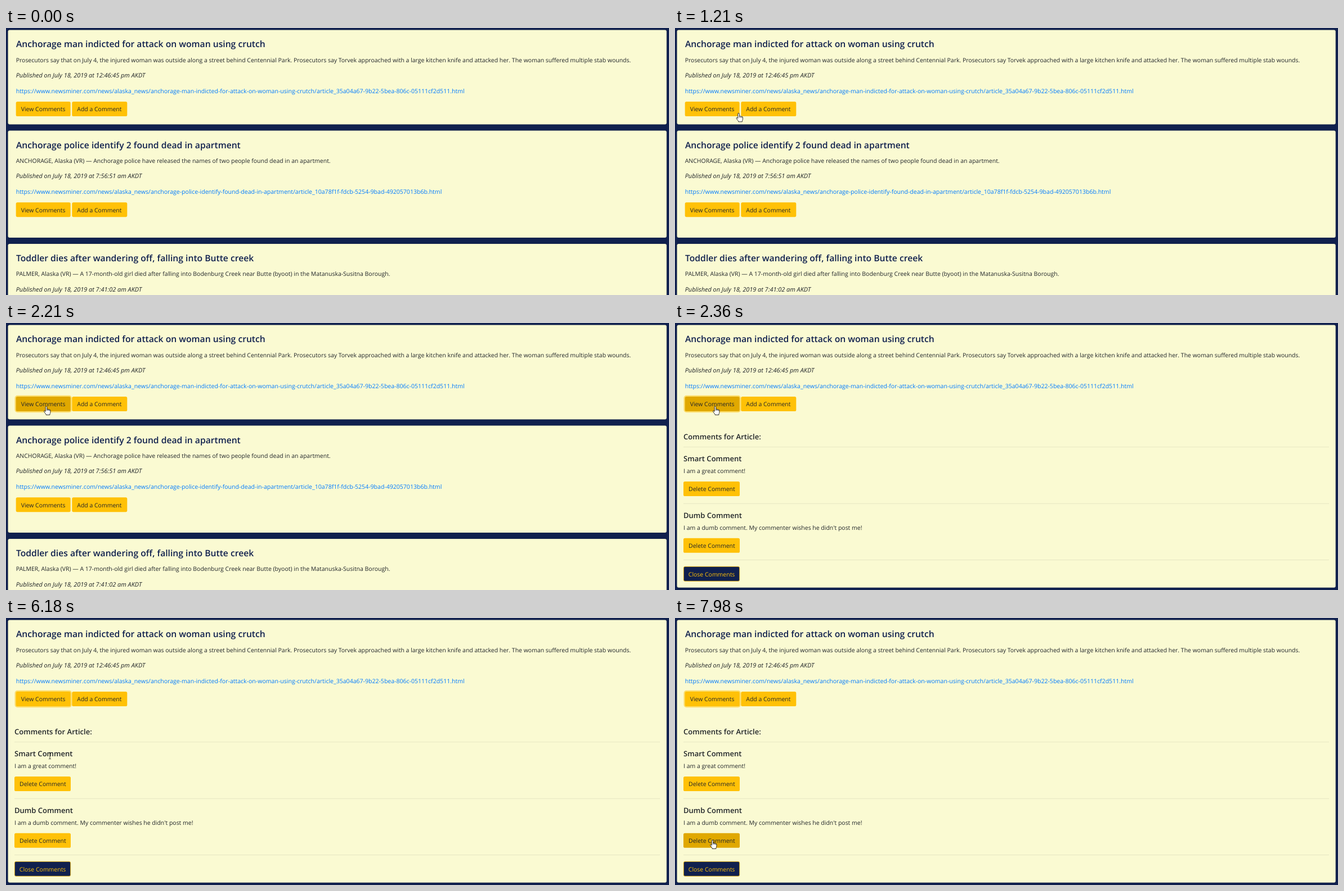
Write an HTML page that moves like this. It is 1178 by 475 pixels and loops after 8 s.

```html
<!DOCTYPE html>
<html lang="en">
<head>
<meta charset="utf-8">
<title>Article comments</title>
<style>
html, body { margin: 0; width: 100%; height: 100%; overflow: hidden; background: #10204e; }
svg { display: block; width: 1178px; height: 475px; }
text { font: 10.47px "Open Sans", "Noto Sans", sans-serif; fill: #212529; text-rendering: geometricPrecision; white-space: pre; }
.title { font-size: 15.68px; font-weight: 600; fill: #10204e; }
.head { font-size: 13.05px; font-weight: 600; }
.date { font-size: 10.93px; font-style: italic; }
.link { font-size: 10.54px; fill: #007bff; }
.close { fill: #ffc107; }
.card { fill: #fafad2; stroke: #000; stroke-opacity: .125; stroke-width: .7; }
</style>
</head>
<body>
<svg id="stage" viewBox="0 0 1178 475" xmlns="http://www.w3.org/2000/svg"></svg>
<script>
const LOOP = 8000;
const NS = 'http://www.w3.org/2000/svg';
const stage = document.getElementById('stage');

function add(parent, tag, attrs = {}, text) {
  const el = document.createElementNS(NS, tag);
  for (const k in attrs) el.setAttribute(k, attrs[k]);
  if (text) el.textContent = text;
  return parent.appendChild(el);
}
const group = () => add(stage, 'g');
const label = (g, x, y, cls, text) => add(g, 'text', { x, y, class: cls }, text);
const card = (g, y, height) =>
  add(g, 'rect', { class: 'card', x: 3.5, y, width: 1170.3, height, rx: 3 });

function button(g, x, y, width, text, dx = 9, style = {}) {
  const rect = add(g, 'rect', { x, y, width, height: 26, rx: 2.6, fill: '#ffc107', ...style });
  label(g, x + dx, y + 17.3, style.stroke ? 'close' : '', text);
  return rect;
}

function article(g, y, title, body, date, link) {
  label(g, 18, y + 31.4, 'title', title);
  label(g, 17.7, y + 57.8, '', body);
  label(g, 17.7, y + 85.2, 'date', 'Published on July 18, 2019 at ' + date + ' AKDT');
  if (!link) return;
  label(g, 17.7, y + 112.8, 'link', 'https://www.newsminer.com/news/alaska_news/' + link + '.html');
  const view = button(g, 17.7, y + 128, 97, 'View Comments');
  button(g, 117.3, y + 128, 98, 'Add a Comment');
  return view;
}

// Article list
const list = group();
card(list, 182.4, 190.6);
card(list, 383.9, 120);
article(list, 182.2, 'Anchorage police identify 2 found dead in apartment',
  'ANCHORAGE, Alaska (VR) — Anchorage police have released the names of two people found dead in an apartment.',
  '7:56:51 am', 'anchorage-police-identify-found-dead-in-apartment/article_10a78f1f-fdcb-5254-9bad-492057013b6b');
article(list, 383.6, 'Toddler dies after wandering off, falling into Butte creek',
  'PALMER, Alaska (VR) — A 17-month-old girl died after falling into Bodenburg Creek near Butte (byoot) in the Matanuska-Susitna Borough.',
  '7:41:02 am');

// First article, which grows when its comments open
const main = group();
const mainCard = card(main, 3.4, 168);
const ring = add(main, 'rect', { x: 17.7, y: 131, width: 97, height: 26, rx: 2.6,
  fill: 'none', stroke: '#ffc107' });
const view = article(main, 3, 'Anchorage man indicted for attack on woman using crutch',
  'Prosecutors say that on July 4, the injured woman was outside along a street behind Centennial Park. ' +
  'Prosecutors say Torvek approached with a large kitchen knife and attacked her. ' +
  'The woman suffered multiple stab wounds.',
  '12:46:45 pm', 'anchorage-man-indicted-for-attack-on-woman-using-crutch/article_35a04a67-9b22-5bea-806c-05111cf2d511');

// Comments
const panel = group();
label(panel, 15, 206.8, 'head', 'Comments for Article:');
for (const y of [220.7, 321.3, 421.5])
  add(panel, 'path', { d: `M15 ${y}H1162`, stroke: '#000', 'stroke-opacity': .1, 'stroke-width': .8 });
function comment(y, head, body) {
  label(panel, 15, y + 25.6, 'head', head);
  label(panel, 15, y + 46.7, '', body);
  return button(panel, 15, y + 61.4, 100, 'Delete Comment');
}
const del1 = comment(220.6, 'Smart Comment', 'I am a great comment!');
const del2 = comment(321.4, 'Dumb Comment', "I am a dumb comment. My commenter wishes he didn't post me!");
button(panel, 15.3, 433.3, 99.4, 'Close Comments', 8.5,
  { fill: '#10204e', stroke: '#ffc107', 'stroke-width': .8 });

// Pointer
const halo = add(stage, 'circle', { cx: 71, cy: 147.5, r: 8, fill: '#e0d800', opacity: .72 });
const pointer = group();
const ink = { fill: '#fff', stroke: '#000', 'stroke-width': .8, 'stroke-linejoin': 'round' };
const shapes = {
  arrow: add(pointer, 'path', { ...ink, d: 'M0 0V11.2L2.6 8.8 4.2 12.7 6 12 4.4 8.2H7.9Z' }),
  hand: add(pointer, 'path', { ...ink, d: 'M-1.3 9.3V1.3Q-1.3 0 0 0T1.3 1.3V5.2Q2.7 4.4 3.5 5.7Q5 5 5.7 6.3' +
    'Q7.4 5.9 7.4 7.7V10.5Q7.3 12.4 6.4 13.6V15.3H-.4V14Q-2.4 12-3.7 9.4Q-4.4 8.2-3.3 7.8Q-2.4 7.8-1.3 9.3Z' +
    'M1.3 5.2V7.8M3.5 5.7V8M5.7 6.3V8.2' }),
  beam: add(pointer, 'path', { fill: 'none', stroke: '#111', 'stroke-width': .8,
    d: 'M-2-5.6Q0-5.6 0-4.6Q0-5.6 2-5.6M0-4.6V4.6M-2 5.6Q0 5.6 0 4.6Q0 5.6 2 5.6' })
};

// Zones: right edge, top, bottom, pointer shape
const listZones = [[115, 131, 157, 'hand'], [774, 284, 299, 'hand'], [581, 230, 244, 'beam'], [243, 257, 271, 'beam']];
const openZones = [[115, 131, 157, 'hand'], [153, 194, 210, 'beam'], [118, 233, 250, 'beam'], [126, 256, 270, 'beam'],
  [115, 282, 308, 'hand'], [119, 334, 350, 'beam'], [333, 357, 371, 'beam'], [115, 383, 409, 'hand']];

// Moments at which the screen refreshes: start, end, count
const bursts = [[590, 1360, 11], [1440, 1440, 1], [1670, 1760, 2], [2050, 2360, 5], [4990, 5790, 11],
  [5880, 6660, 11], [6740, 7420, 10], [7580, 7580, 1], [7810, 7810, 1], [7980, 7980, 1]];
const steps = bursts.flatMap(([a, b, n]) =>
  Array.from({ length: n }, (_, i) => n > 1 ? a + (b - a) * i / (n - 1) : a));

// Pointer path: time, x, y
const path = [[590, 806, 381], [740, 620, 312], [900, 330, 222], [1060, 168, 170], [1206, 113, 151.5], [1290, 90, 151],
  [1360, 74, 150.5], [1440, 71.5, 149.5], [1670, 71.3, 148.8], [1760, 71.5, 148.2], [4900, 71.5, 148.2],
  [4990, 69.8, 150.3], [5230, 69, 158], [5550, 72, 195], [5790, 75, 224], [6190, 78, 245], [6430, 73, 283],
  [6590, 69, 308], [6660, 67, 328], [6900, 64, 362], [7100, 64, 385], [7420, 66, 394.5], [7810, 66.4, 395], [8000, 66.5, 395.2]];

const clamp = v => Math.max(0, Math.min(1, v));
const fade = (t, from, until = 1e6) => clamp((t - from) / 150) * (1 - clamp((t - until) / 150));

function locate(t) {
  const i = Math.max(1, path.findIndex(p => p[0] >= t));
  const [t0, x0, y0] = path[i - 1], [t1, x1, y1] = path[i];
  const k = clamp((t - t0) / (t1 - t0));
  return [x0 + (x1 - x0) * k, y0 + (y1 - y0) * k];
}
function paint(el, from, to, k) {
  el.setAttribute('fill', `rgb(${from.map((v, i) => Math.round(v + (to[i] - v) * k))})`);
}
const show = (el, on) => el.setAttribute('visibility', on ? 'visible' : 'hidden');

const YELLOW = [255, 193, 7], HOVER = [224, 168, 0], ACTIVE = [211, 158, 0];

function draw(now) {
  const t = now % LOOP;
  let s = 0;
  for (const step of steps) if (step <= t + 14) s = step;

  const open = s >= 2280;
  const pressed = s >= 2050 && s < 2200;
  list.style.display = open ? 'none' : '';
  panel.style.display = open ? '' : 'none';
  mainCard.setAttribute('height', open ? 467.4 : 168);

  if (pressed) paint(view, HOVER, ACTIVE, 1);
  else paint(view, YELLOW, HOVER, fade(s, 1206, 5220));
  paint(del1, YELLOW, HOVER, fade(s, 6380, 6600));
  paint(del2, YELLOW, HOVER, fade(s, 7020));

  // The focus ring spreads from under the button while it fades in
  const focus = fade(s, 2050);
  ring.setAttribute('stroke-width', 4.4 * focus);
  ring.setAttribute('stroke-opacity', .5 * focus);
  show(halo, pressed);

  const [x, y] = locate(s);
  const zone = (open ? openZones : listZones).find(z => x > 15 && x < z[0] && y >= z[1] && y <= z[2]);
  const kind = zone ? zone[3] : 'arrow';
  pointer.setAttribute('transform', `translate(${x.toFixed(1)} ${y.toFixed(1)})`);
  for (const k in shapes) show(shapes[k], s > 0 && k === kind);
}

const start = performance.now();
function tick() {
  draw(performance.now() - start);
  requestAnimationFrame(tick);
}
tick();
</script>
</body>
</html>
```
